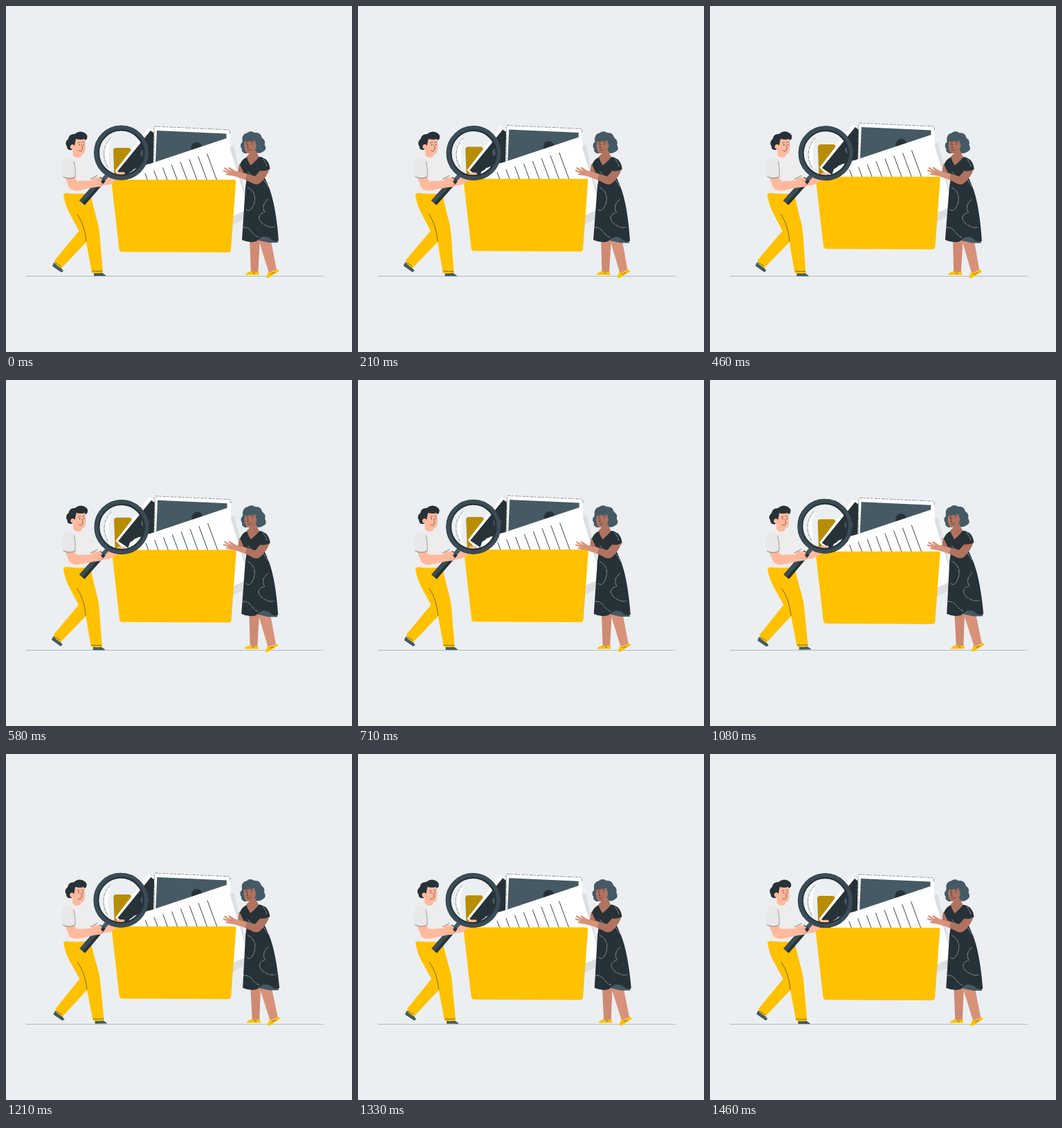
An HTML page that plays this animation: 500 by 500 pixels, repeating every 1500 ms.

```html
<!DOCTYPE html>
<html lang="en">
<head>
<meta charset="utf-8">
<title>Folder search</title>
<style>
  html, body { margin: 0; width: 100%; height: 100%; overflow: hidden; background: #ebeff2; }
  svg { display: block; width: 100%; height: 100%; }
  .ink { fill: #263238; }
  .slate { fill: #455a64; }
  .sun { fill: #ffc100; }
  .skin { fill: #ffb99c; }
  .brown { fill: #b0735f; }
  .tan { fill: #d8927a; }
  .white { fill: #fff; }
  .shirt { fill: #ededed; }
  .line { fill: none; stroke: #263238; stroke-width: .6; stroke-linecap: round; stroke-linejoin: round; }
  .pale { fill: none; stroke: #cfd8dc; stroke-width: .55; stroke-dasharray: 7 .8; }
  .ring { fill: none; }
</style>
</head>
<body>
<svg viewBox="0 0 500 500">
  <path d="M29 390.5H459" stroke="#a3adb3" stroke-width=".8"/>

  <g id="papers">
    <path fill="#b78d04" d="M157 260L155 209Q155 205 159 205H177Q180 205 181 209L192 260Z"/>
    <path fill="#dcdfe0" d="M250 235L329 202L353 304L325 318Z"/>
    <!-- tilted photo -->
    <path class="white" d="M157.500 238.500L206 175.500L240 200V260H178Z"/>
    <path class="ink" d="M161 239L209 180L240 203V252H180Z"/>
    <path class="white" d="M176 247L178 241L184 237L187 239L190 233L196 236L203 229L222 226V254H174Z"/>
    <circle class="slate" cx="200" cy="213" r="6"/>
    <!-- upright photo -->
    <path class="white" d="M214 174L323.500 179L325 262H212Z"/>
    <path class="slate" d="M218 180L318.500 184.500V250H215Z"/>
    <path class="line" d="M214 228V174L323.500 179V184" stroke-dasharray="4 2 2 3" style="stroke-width:.5"/>
    <circle class="ink" cx="275.500" cy="205" r="8"/>
    <path class="ink" d="M244 219L252 213L256 216L262 212V224H244Z"/>
    <!-- lined sheet -->
    <path class="white" d="M184 236L319 191L350.500 294L322 306L190 265Z"/>
    <path id="rules" class="line" style="stroke-width:.9"/>
  </g>

  <path id="folder" class="sun" d="M155.500 251H329.500Q332.500 251 332.200 254L325 352Q324.700 356 320.700 356L168 355.300Q164 355.300 163.500 351.300L152.500 254.500Q152 251 155.500 251Z"/>

  <g id="man">
    <!-- far arm -->
    <path class="skin" d="M122 246L137 249L154 246L163 240L171 240L172 243L165 245L160 252L150 258L128 261Z"/>
    <path class="shirt" d="M112 217Q119 217 122 224L133 245L121 252L113 238Z"/>
    <path class="line" d="M122 250L132 245" stroke-dasharray="2 1"/>
    <!-- legs -->
    <path class="slate" d="M69 371L80 379L83 383L80 385L67 376Z"/>
    <path class="sun" d="M83 271Q84 284 91 298L105.500 325L70 368Q70 374 80 379L118 339L119 271Z"/>
    <path class="line" d="M70 371Q75 373 79 376"/>
    <path class="slate" d="M127 385H138L144 389V390H127Z"/>
    <path class="sun" d="M86 270H122Q125 286 132 311Q135 322 136 338L140 385.500Q132 387 124 385.500L116 341L100 305Z"/>
    <path class="line" d="M103 301Q114 317 116 340M125 383Q132 384 139 383"/>
    <!-- torso and head -->
    <path class="shirt" d="M86 219Q92 217 97 215L108 216Q118 217 120 224L121 245L123 270Q103 273 85 270L86 250L82 240Z"/>
    <path class="skin" d="M96 203L108 209L109 217Q102 222 97 216Z"/>
    <path class="ink" d="M95 208Q88 209 88 203Q84 197 90 192Q91 185 99 185Q106 179 113 183Q119 186 117 192Q114 196 108 193L100 202Z"/>
    <path class="skin" d="M101 192Q108 194 113.500 192Q116.500 203 113.500 212Q110 217 104 213Q98 211 97 207Q92 207 93 202Q96 198 99 202Z"/>
    <path class="line" d="M104 198L107 197M110 197L113 197M109 201L111 206L109 207M105 209Q108 211 110 209"/>
    <circle class="ink" cx="106" cy="200.500" r=".8"/>
    <circle class="ink" cx="112" cy="200.500" r=".7"/>

    <!-- magnifier -->
    <path fill="#fff" opacity=".8" d="M155 187Q129 208 152 239Q143 210 155 187Z"/>
    <path class="line" d="M152 190Q134 208 147 233" style="stroke-width:.5" stroke-dasharray="5 2"/>
    <circle class="ring" cx="166.500" cy="212" r="35.500" stroke="#263238" stroke-width="8"/>
    <circle class="ring" cx="166.800" cy="212" r="36.500" stroke="#3b4c56" stroke-width="5.500"/>
    <path class="line" d="M146 245L136 256" style="stroke:#455a64;stroke-width:6;stroke-linecap:butt"/>
    <path class="line" d="M140 250L110 284.500" style="stroke:#263238;stroke-width:10;stroke-linecap:butt"/>
    <path class="line" d="M138.500 249L108.500 283" style="stroke:#3b4c56;stroke-width:6;stroke-linecap:butt"/>

    <!-- near arm -->
    <path class="skin" d="M85 246L98 247L103 253L126 252L134 247L139 250L137 254L140 257L137 261L128 262L104 267Q94 267 91 262Z"/>
    <path class="line" d="M133 253L138 252M132 258L138 257" style="stroke:#e58c70"/>
    <path class="shirt" d="M87 219Q80 223 80 236L83 248Q91 251 100 247L101 224Z" style="fill:#e8e8e8"/>
    <path class="line" d="M98 225Q101 235 100 247" style="stroke-width:.4"/>
    <path class="line" d="M83 247Q91 251 100 247" stroke-dasharray="2 1"/>
  </g>

  <g id="woman">
    <path class="brown" d="M337 228L346 236L342 245L335 242Z"/>
    <!-- legs -->
    <path class="tan" d="M352 333H367L364.500 385L354 386Z" style="fill:#cf8a73"/>
    <path class="sun" d="M354 383Q360 386 365 383L366 388.500H346Q346 386 354 383Z"/>
    <path class="tan" d="M364 334H382L391 381L380 386Z"/>
    <path class="sun" d="M379 384Q386 386 391 380L395 383L379 393L376 392Z"/>
    <path class="line" d="M357 385L360 387M383 387L388 385"/>
    <path class="slate" d="M362 338Q376 328 392 337L393 342L380 342Z"/>
    <!-- dress -->
    <path class="ink" d="M349 218Q342 220 338 229L344 242L348.500 245L346 262L341 338Q352 343 362 340Q370 330 381 335Q387 342 394 339Q390 288 380 262L373 246L381 235Q377 220 368 218Z"/>
    <path class="pale" d="M349 262Q362 268 359 284Q354 300 347 294M379 279Q368 288 374 298Q360 302 369 313Q380 322 389 319M342 320Q350 319 355 326T365 334M349 239Q357 245 354 251M371 249Q376 257 380 262"/>
    <!-- head -->
    <g transform="translate(-1.300 -.8)">
      <path class="slate" d="M342 207Q338 202 343 197Q341 186 350 184Q355 180 361 184Q369 183 371 191Q377 195 375 201Q379 208 373 211Q366 216 360 211L347 214Q341 212 342 207Z"/>
      <path class="brown" d="M349 218L361 207L367 219Q361 226 355 231Q351 226 349 218Z"/>
      <path class="brown" d="M347 195Q356 192 363 194Q365 208 357 213Q350 216 347 210Q344 202 347 195Z"/>
      <path class="slate" d="M345 196Q348 188 356 190Q366 189 365 205Q362 201 361 195Q353 197 345 196Z"/>
      <path class="line" d="M348 197L351 197M355 197L359 197M351 200L350 206L352 206M350 209Q353 211 356 208"/>
      <circle class="ink" cx="349.500" cy="200" r=".8"/>
      <circle class="ink" cx="357" cy="200" r=".8"/>
    </g>
    <!-- near arm -->
    <path class="brown" d="M369 236L381 235Q377 247 367 256Q361 260 354 255L330 244L331 239L341 240L360 246Z"/>
    <path class="tan" d="M348 243L331 238L323 233L321 234L326 239L316 233L315 235L322 239L314 237L314 239L322 242L318 242L318 244L330 246L346 251Z"/>
    <path class="ink" d="M365 221L375 221Q381 227 381.500 235.500Q375 239 368 238Z"/>
    <path class="pale" d="M371 221Q376 226 377 232"/>
  </g>
</svg>
<script>
  const LOOP = 1500;
  const LEAD = 20;
  const el = id => document.getElementById(id);
  const place = (id, transform) => el(id).setAttribute('transform', transform);
  const turn = ms => ms / LOOP * Math.PI * 2;

  let rules = '';
  for (let i = 0; i < 8; i++) {
    rules += `M${201 + 12.8 * i} ${242 - 4.05 * i}l17 46`;
  }
  el('rules').setAttribute('d', rules);

  function draw(ms) {
    const t = ms % LOOP;
    const lift = 3 * (1 - Math.cos(turn(t + LEAD)));
    const sway = 0.8 * Math.sin(turn(t));
    place('papers', `translate(${0.2 * lift} ${-1.15 * lift})`);
    place('folder', `translate(${0.1 * lift} ${-lift})`);
    place('man', `rotate(${sway} 110 260)`);
    place('woman', `rotate(${sway} 345 250)`);
  }

  const start = performance.now();
  function tick() {
    draw(performance.now() - start);
    requestAnimationFrame(tick);
  }
  tick();
</script>
</body>
</html>
```
